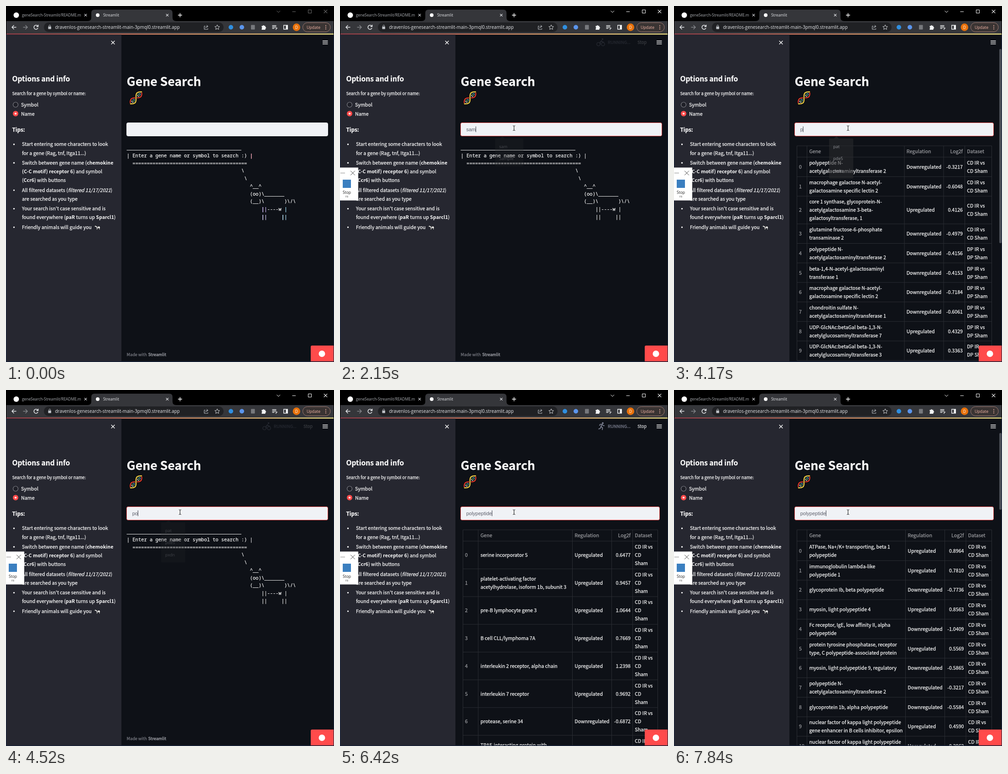
An HTML page for the animation above (8 s loop, 719 by 779 pixels).

```html
<!DOCTYPE html>
<html lang="en">
<head>
<meta charset="utf-8">
<title>Gene Search</title>
<style>
html, body { margin: 0; width: 100%; height: 100%; overflow: hidden; background: #0a0f18; }
svg { display: block; width: 100%; height: 100%; }
text { white-space: pre; }
.body { font-family: "Noto Sans CJK JP", "Noto Sans CJK SC", "Noto Sans CJK", "Noto Sans", sans-serif; }
.ui { font-family: "Open Sans", "Noto Sans", sans-serif; }
.mono { font-family: "Noto Sans Mono", "DejaVu Sans Mono", monospace; }
.field { font-family: "Liberation Sans", Arial, sans-serif; }
/* a hairline outline gives the text a medium weight */
.body, .mono { stroke-width: .25px; }
.ui, .field { stroke-width: 0; }
</style>
</head>
<body>
<svg id="stage" viewBox="0 0 719 779" preserveAspectRatio="none">
  <defs>
    <linearGradient id="stripe"><stop offset="0" stop-color="#a8404c"/><stop offset=".35" stop-color="#e07a62"/><stop offset="1" stop-color="#fff08a"/></linearGradient>
    <clipPath id="page"><rect x="1" y="62" width="717" height="715.5"/></clipPath>
  </defs>
</svg>
<script>
const LOOP = 8000;
const WHITE = '#fafafa', GREY = '#9c9da1', RED = '#ff4b4b';
const svg = document.getElementById('stage');

function el(tag, attrs, parent = svg) {
  const node = document.createElementNS('http://www.w3.org/2000/svg', tag);
  for (const key in attrs) node.setAttribute(key, attrs[key]);
  parent.appendChild(node);
  return node;
}
const group = (parent = svg, attrs = {}) => el('g', attrs, parent);
const box = (x, y, width, height, fill, parent, more = {}) =>
  el('rect', { x, y, width, height, fill, ...more }, parent);
const dot = (cx, cy, r, fill, parent, more = {}) => el('circle', { cx, cy, r, fill, ...more }, parent);
const line = (d, stroke, width, parent, more = {}) =>
  el('path', { d, fill: 'none', stroke, 'stroke-width': width, ...more }, parent);
const shape = (d, fill, parent) => el('path', { d, fill }, parent);
const cross = (x, y, r, stroke, width, parent) =>
  line(`M${x - r} ${y - r}l${2 * r} ${2 * r}m0 ${-2 * r}l${-2 * r} ${2 * r}`, stroke, width, parent);

function label(x, y, str, size, fill, parent, cls = 'body', more = {}) {
  const node = el('text', { x, y, 'font-size': size, fill, stroke: fill, class: cls, ...more }, parent);
  node.textContent = str;
  return node;
}
// *bold* and _italic_ markers become tspans
function rich(x, y, str, size, fill, parent) {
  const node = label(x, y, '', size, fill, parent);
  for (const part of str.split(/(\*[^*]+\*|_[^_]+_)/)) {
    if (!part) continue;
    const style = part[0] === '*' ? { 'font-weight': 700, 'stroke-width': 0 }
      : part[0] === '_' ? { 'font-style': 'italic' } : {};
    el('tspan', style, node).textContent = /^[*_]/.test(part) ? part.slice(1, -1) : part;
  }
}
const show = (node, alpha) => {
  node.style.opacity = alpha;
  node.style.display = alpha > 0 ? '' : 'none';
};

function browser() {
  box(0, 0, 719, 62, '#000');
  shape('M179 33q8 0 8-8v-10q0-7 7-7h164q7 0 7 7v10q0 8 8 8z', '#35363a');
  box(1, 33, 717, 28, '#35363a');
  dot(22.5, 20, 6, '#fff');
  label(35, 23.2, 'geneSearch-Streamlit/README.m', 8.37, '#aeb1b6', svg, 'ui');
  dot(201, 20, 4, '#fff');
  label(213, 23.2, 'Streamlit', 8.35, '#e8eaed', svg, 'ui');
  cross(174.5, 20, 2.7, '#dadce0', 1.1);
  cross(353.5, 20, 2.7, '#e8eaed', 1.1);
  line('M377 20h9m-4.5-4.5v9', '#fff', 1.4);

  line('M22.5 46.5h-9m4-4.5l-4.5 4.5 4.5 4.5', '#e8eaed', 1.4);
  line('M37.5 46.5h9m-4-4.5l4.5 4.5-4.5 4.5', '#85878b', 1.4);
  line('M69.5 44a4.5 4.5 0 1 0 .5 4M70.500 41v4h-4', '#e8eaed', 1.5);
  box(83, 36, 394, 21, '#202124', svg, { rx: 10.5 });
  box(92.5, 45, 6.5, 5.5, '#bdc1c6', svg, { rx: .8 });
  line('M94 45v-1.5a1.8 1.8 0 0 1 3.6 0v1.5', '#bdc1c6', 1);
  label(107.5, 50, 'dravenlos-genesearch-streamlit-main-3pmql0.streamlit.app', 9.88, '#e8eaed', svg, 'ui');
  line('M437 44h-2.5v7h8v-2M437 48.5q.5-4 5-4m-2.5-2.5l3.5 2.5-3.5 2.7', '#bdc1c6', 1);
  line('M463 41.3l1.6 3.4 3.7.4-2.8 2.5.8 3.7-3.3-1.9-3.3 1.9.8-3.7-2.8-2.5 3.7-.4z', '#d2d4d8', 1);

  dot(493, 46.5, 5, '#2f8fe0');
  dot(517, 46.5, 5, '#5b95ec');
  box(537, 41.5, 8.5, 10, '#77797d', svg, { rx: 1 });
  shape('M560.5 43.5h2.5a1.5 1.5 0 0 1 3 0h2.5v2.5a1.7 1.7 0 0 1 0 3.4v2.6h-8v-2.8a1.5 1.5 0 0 0 0-2.8z', '#f1f3f4');
  line('M583.5 43h9m-9 3h9m-9 3h5m3.5-1v4m0-3.5h3', '#f1f3f4', 1.3);
  line('M608.7 42.2h8.6v8.6h-8.6z', '#f1f3f4', 1.4);
  box(613.5, 42, 4, 9, '#f1f3f4');
  dot(636.8, 46.5, 8.2, '#e8710a');
  label(636.8, 49.7, 'D', 8.5, '#fff', svg, 'ui', { 'text-anchor': 'middle' });
  box(650.5, 36.5, 60.5, 20, '#3a3433', svg, { rx: 10, stroke: '#a07a72' });
  label(659, 49.7, 'Update', 8.8, '#f3b5a6', svg, 'ui');
  for (const y of [42.8, 46.5, 50.2]) dot(701, y, 1, '#f3b5a6');
  box(1, 60.4, 717, 2.1, 'url(#stripe)');

  const controls = group();
  line('M593.5 10.5l3.8 3.7 3.8-3.7M627.5 12.5h7.5M662.5 8.5h7v7h-7z', '#fff', 1, controls);
  cross(700.5, 12, 3.7, '#fff', 1.1, controls);
  return controls;
}

function sidebar() {
  box(1, 62.5, 252, 715, '#262730');
  cross(234.5, 80, 3.8, WHITE, 1.4);
  const head = { 'font-weight': 600, 'stroke-width': 0 };
  label(13.5, 165.2, 'Options and info', 15.6, WHITE, svg, 'body', head);
  label(13.5, 195, 'Search for a gene by symbol or name:', 9.3, WHITE);
  dot(21, 216, 5.5, '#1f2028', svg, { stroke: '#808188', 'stroke-width': 1.2 });
  dot(21, 235.5, 6, RED);
  dot(21, 235.5, 2.1, '#fff');
  label(33, 220.2, 'Symbol', 10.7, WHITE);
  label(33, 239.5, 'Name', 10.7, WHITE);
  label(13.5, 275, 'Tips:', 11.8, WHITE, svg, 'body', head);
  const tips = [
    ['Start entering some characters to look', 'for a gene (Rag, tnf, Itga11...)'],
    ['Switch between gene name (*chemokine*', '*(C-C motif) receptor 6*) and symbol', '(*Ccr6*) with buttons'],
    ['All filtered datasets (_filtered 11/17/2021_)', 'are searched as you type'],
    ["Your search isn't case sensitive and is", 'found everywhere (*paR* turns up *Sparcl1*)'],
    ['Friendly animals will guide you']
  ];
  let y = 306.3;
  for (const tip of tips) {
    dot(17.5, y - 3.5, 1.7, WHITE);
    tip.forEach((str, i) => rich(35, y + i * 19.3, str, 10.65, WHITE));
    y += tip.length * 19.3 + 1.9;
  }
  // small cow
  line('M194 481.5l2.5-1 2 1.5h6.5l1.5 3-.8 1v3.5h-1.7v-3h-3.5v3h-1.8v-4.5l-1.7-1.5-3-.5z', '#0b0b0b', .6, svg, { fill: '#f4f4f4' });
  shape('M199.5 482.5l3 .2-.8 2-2-.4z', '#222');
}

function helix() {
  const g = group(svg, { transform: 'translate(285 201) rotate(-46)' });
  const wave = x => 6 * Math.sin(x / 5.8);
  const strand = side => {
    let d = '';
    for (let x = -18; x <= 18; x++) d += `${d ? 'L' : 'M'}${x} ${(side * wave(x)).toFixed(2)}`;
    return d;
  };
  ['#58b7e8', '#f2f2f2', '#6cc069'].forEach((color, k) => {
    for (let x = -15 + 3 * k; x <= 16; x += 9) line(`M${x} ${-wave(x)}V${wave(x)}`, color, 1.2, g);
  });
  for (const [side, color] of [[1, '#e8392f'], [-1, '#f8d34a']]) {
    line(strand(side), '#000', 3.8, g, { 'stroke-linecap': 'round' });
    line(strand(side), color, 2.2, g, { 'stroke-linecap': 'round' });
  }
}

// ASCII cow on a character grid
function cowSays() {
  const g = group();
  const put = (col, row, str, fill = '#f5f5f5', parent = g) =>
    label(264.8 + col * 6.28, 314 + row * 16.78, str, 10.46, fill, parent, 'mono');
  put(0, 0, '_'.repeat(40));
  put(0, 1, '| Enter a gene name or symbol to search :) |');
  put(2, 2, '='.repeat(40));
  put(40, 3, '\\');
  put(41, 4, '\\');
  put(43, 5, '^__^');
  put(43, 6, '(oo)\\_______');
  put(43, 7, '(__)\\       )\\/\\');
  put(47, 8, '||----w |');
  put(47, 9, '||     ||');
  const tint = group(g);
  put(43, 1, '|', '#f58aa0', tint);
  put(47, 8, '||', '#c3a5f5', tint);
  put(55, 8, '|', '#8fdcf5', tint);
  put(47, 9, '||', '#c8c0f5', tint);
  put(54, 9, '||', '#9cd8f5', tint);
  label(264.5, 765.8, 'Made with', 9.2, '#7a7c84', g);
  label(311.8, 765.8, 'Streamlit', 9.2, '#b4b6bd', g);
  return { g, tint };
}

// rows: [gene, log2 fold, dataset]; "/ " breaks a cell into lines
function table(cols, rows) {
  const g = group(svg, { 'clip-path': 'url(#page)' });
  const [c1, c2, c3, c4] = cols, left = 269.5, right = 696.5;
  const xs = [274, c1 + 5, c2 + 4.8, c4 - 4.5, c4 + 4.8];
  let y = 306, grid = '';
  const cell = (i, mid, str, fill) => {
    const lines = str.split('/ ');
    const more = { 'text-anchor': i === 3 ? 'end' : 'start' };
    lines.forEach((s, k) =>
      label(xs[i], mid + 4 + (k - (lines.length - 1) / 2) * 18, s, 10.65, fill, g, 'body', more));
  };
  const row = (cells, fill, height) => {
    cells.forEach((str, i) => cell(i, y + height / 2, str, i ? fill : GREY));
    grid += `M${left} ${y}H${right}`;
    y += height;
  };
  row(['', 'Gene', 'Regulation', 'Log2f', 'Dataset'], GREY, 24.7);
  rows.forEach(([gene, fold, set], i) => {
    const n = Math.max(gene.split('/ ').length, set.split('/ ').length);
    row([String(i), gene, fold[0] === '-' ? 'Downregulated' : 'Upregulated', fold, set], WHITE, n * 18 + 6.7);
  });
  grid += `M${left} ${y}H${right}`;
  for (const x of [left, ...cols, right]) grid += `M${x} 306V${y}`;
  line(grid, '#2a2d33', 1, g);
  return g;
}

function menu(width, items) {
  const g = group();
  shape('M350 290.5l6-5.5 6 5.5z', '#292a2d', g);
  box(340, 290, width, 7 + 26.8 * items.length, '#292a2d', g, { rx: 2 });
  items.forEach((s, i) => label(349, 310.5 + i * 26.8, s, 9.1, '#eceef1', g, 'ui'));
  return g;
}

function status() {
  const g = group();
  const bike = group(g), runner = group(g, { transform: 'translate(1 0)' });
  const color = '#808495';
  for (const x of [566.5, 576.5]) dot(x, 83.5, 3.7, 'none', bike, { stroke: color, 'stroke-width': 1.3 });
  line('M571 84l-1-4 3.5-4 2 3h3M570 79.5l3-3.500', color, 1.5, bike);
  dot(575.5, 72.5, 1.7, color, bike);
  dot(575, 72.5, 1.9, color, runner);
  line('M573.5 75l-2.5 5 3.5 2.5-.5 5M571 80l-1.5 4-4 1.5M567.5 78l2-3 4 0 2.5 3h3', color, 1.7, runner);
  label(587, 83.2, 'RUNNING...', 9.35, color, g);
  label(652, 83.2, 'Stop', 9.35, '#d8d9dc', g);
  return { g, bike, runner };
}

function recorder() {
  const g = group();
  box(0, 353.5, 40, 72, '#fff', g);
  line('M1 365.5h10', '#8a8a8a', 1, g);
  cross(28, 365.5, 4.8, '#444', 1, g);
  box(6, 380, 18, 18, '#3b7fc0', g);
  label(15, 410.7, 'Stop', 8.5, '#222', g, 'ui', { 'text-anchor': 'middle' });
  label(15, 419.3, 'F8', 6, '#555', g, 'ui', { 'text-anchor': 'middle' });
  return g;
}

box(0, 0, 719, 779, '#1a2740');
box(1, 62, 717, 715.5, '#0e1117');
const controls = browser();
sidebar();
line('M694 76.5h11.5m-11.5 3.3h11.5m-11.5 3.3h11.5', WHITE, 1.3);
label(264.5, 174.8, 'Gene Search', 26.7, WHITE, svg, 'body', { 'font-weight': 700 });
helix();

const field = box(264.5, 255.5, 441, 29, '#f0f2f6', svg, { rx: 3 });
const typed = label(276.7, 273.5, '', 11, '#5c5f6b', svg, 'field');
const caret = box(0, 263.5, 1, 12.5, '#31333f');

const cow = cowSays();
const CD = 'CD IR vs/ CD Sham', DP = 'DP IR vs/ DP Sham', CD3 = 'CD IR vs/ CD/ Sham';
const samTable = table([291.5, 505, 591, 637.5], [
  ['polypeptide N-/ acetylgalactosaminyltransferase 2', '-0.3217', CD],
  ['macrophage galactose N-acetyl-/ galactosamine specific lectin 2', '-0.6048', CD],
  ['core 1 synthase, glycoprotein-N-/ acetylgalactosamine 3-beta-/ galactosyltransferase, 1', '0.4126', CD],
  ['glutamine fructose-6-phosphate/ transaminase 2', '-0.4979', CD],
  ['polypeptide N-/ acetylgalactosaminyltransferase 2', '-0.4156', DP],
  ['beta-1,4-N-acetyl-galactosaminyl/ transferase 1', '-0.4153', DP],
  ['macrophage galactose N-acetyl-/ galactosamine specific lectin 2', '-0.7184', DP],
  ['chondroitin sulfate N-/ acetylgalactosaminyltransferase 1', '-0.6061', DP],
  ['UDP-GlcNAc:betaGal beta-1,3-N-/ acetylglucosaminyltransferase 7', '0.4329', DP],
  ['UDP-GlcNAc:betaGal beta-1,3-N-/ acetylglucosaminyltransferase 3', '0.3363', DP]
]);
const firstTable = table([303, 509.5, 595.5, 641.5], [
  ['serine incorporator 5', '0.6477', CD3],
  ['platelet-activating factor/ acetylhydrolase, isoform 1b, subunit 3', '0.9457', CD3],
  ['pre-B lymphocyte gene 3', '1.0644', CD3],
  ['B cell CLL/lymphoma 7A', '0.7669', CD3],
  ['interleukin 2 receptor, alpha chain', '1.2398', CD3],
  ['interleukin 7 receptor', '0.9692', CD3],
  ['protease, serine 34', '-0.6872', CD3],
  ['TRAF-interacting protein with/ forkhead-associated domain', '0.5214', CD3]
]);
const lastTable = table([291.5, 507.5, 593.5, 640], [
  ['ATPase, Na+/K+ transporting, beta 1/ polypeptide', '0.8964', CD],
  ['immunoglobulin lambda-like/ polypeptide 1', '0.7810', CD],
  ['glycoprotein Ib, beta polypeptide', '-0.7736', CD],
  ['myosin, light polypeptide 4', '0.8563', CD],
  ['Fc receptor, IgE, low affinity II, alpha/ polypeptide', '-1.0409', CD],
  ['protein tyrosine phosphatase, receptor/ type, C polypeptide-associated protein', '0.5569', CD],
  ['myosin, light polypeptide 9, regulatory', '-0.5865', CD],
  ['polypeptide N-/ acetylgalactosaminyltransferase 2', '-0.3217', CD],
  ['glycoprotein 1b, alpha polypeptide', '-0.5584', CD],
  ['nuclear factor of kappa light polypeptide/ gene enhancer in B cells inhibitor, epsilon', '0.4590', CD],
  ['nuclear factor of kappa light polypeptide/ gene enhancer in B cells inhibitor, zeta', '0.3963', CD]
]);
const thumb = box(713, 94, 5, 425, '#4a4d55', svg, { rx: 2.5 });
const menus = [
  menu(45, ['sem', 'map', 'war', 'pat', 'Far', 'gap']),
  menu(62, ['sam', 'Sample']),
  menu(53, ['pat', 'pde5', 'pxdn'])
];
const run = status();
shape('M668 777.5v-31.5q0-3 3-3h47v34.5z', RED);
dot(692.5, 761, 7, '#fff');
const panel = recorder();
const beam = line('M379 262q2.5 0 2.5 1.5 0-1.5 2.5-1.5M381.5 263v8.5M379 272.5q2.5 0 2.5-1.5 0 1.5 2.5 1.5', '#111', 1);

// keys: the moment each letter of the word is typed
const words = [
  { word: 'sam', keys: [1880, 1950, 2080], end: 3840 },
  { word: 'polypeptide', keys: [4170, 4450, 4590, 4790, 5270, 5340, 5410, 5480, 5680, 5890, 6030], end: LOOP }
];
const caretOn = [[1130, 1680], [1880, 2550], [3030, 3510], [4170, 6650], [6960, 7360], [7840, LOOP]];

const ramp = (t, a, b) => Math.min(1, Math.max(0, (t - a) / (b - a)));
const pulse = (t, a, b, c, d) => ramp(t, a, b) * (1 - ramp(t, c, d));
const within = (t, a, b) => t >= a && t < b;

function draw(t) {
  show(panel, t >= 70 ? 1 : 0);
  controls.style.opacity = t < 600 ? .42 : 1;
  show(beam, t >= 800 ? 1 : 0);

  const inSam = pulse(t, 2450, 2620, 4240, 4450);
  const inFirst = pulse(t, 5270, 5480, 6500, 6700);
  const inLast = ramp(t, 6500, 6700);
  show(samTable, inSam);
  show(firstTable, inFirst);
  show(lastTable, inLast);
  show(cow.g, Math.max(1 - ramp(t, 2450, 2600), pulse(t, 4240, 4400, 5270, 5420)));
  show(cow.tint, t < 2080 ? 1 : 0);

  const narrow = inSam + inFirst + inLast > .5;
  field.setAttribute('width', narrow ? 436 : 441);
  field.setAttribute('stroke', t >= 1080 ? '#f0504f' : '#f0f2f6');
  thumb.setAttribute('height', t < 6000 ? 425 : 168);
  show(thumb, Math.max(pulse(t, 2550, 2620, 4240, 4310), inLast));

  const entry = words.find(w => within(t, w.keys[0], w.end));
  const str = entry ? entry.word.slice(0, entry.keys.filter(k => k <= t).length) : '';
  typed.textContent = str;
  caret.setAttribute('x', 276.5 + (str ? typed.getComputedTextLength() : 0));
  show(caret, caretOn.some(([a, b]) => within(t, a, b)) ? 1 : 0);

  show(menus[0], t < 1880 ? ramp(t, 1130, 1220) : 0);
  show(menus[1], t >= 1880 ? 1 - ramp(t, 2080, 2175) : 0);
  show(menus[2], pulse(t, 4130, 4200, 4450, 4540));

  show(run.g, Math.max(pulse(t, 2080, 2420, 2690, 2830), pulse(t, 4450, 4800, 6960, 7200)));
  const running = within(t, 2450, 3000) || t >= 5060;
  show(run.runner, running ? 1 : 0);
  show(run.bike, running ? 0 : 1);
}

const start = performance.now();
function tick(now) {
  draw(Math.max(0, now - start) % LOOP);
  requestAnimationFrame(tick);
}
draw(0);
requestAnimationFrame(tick);
</script>
</body>
</html>
```
